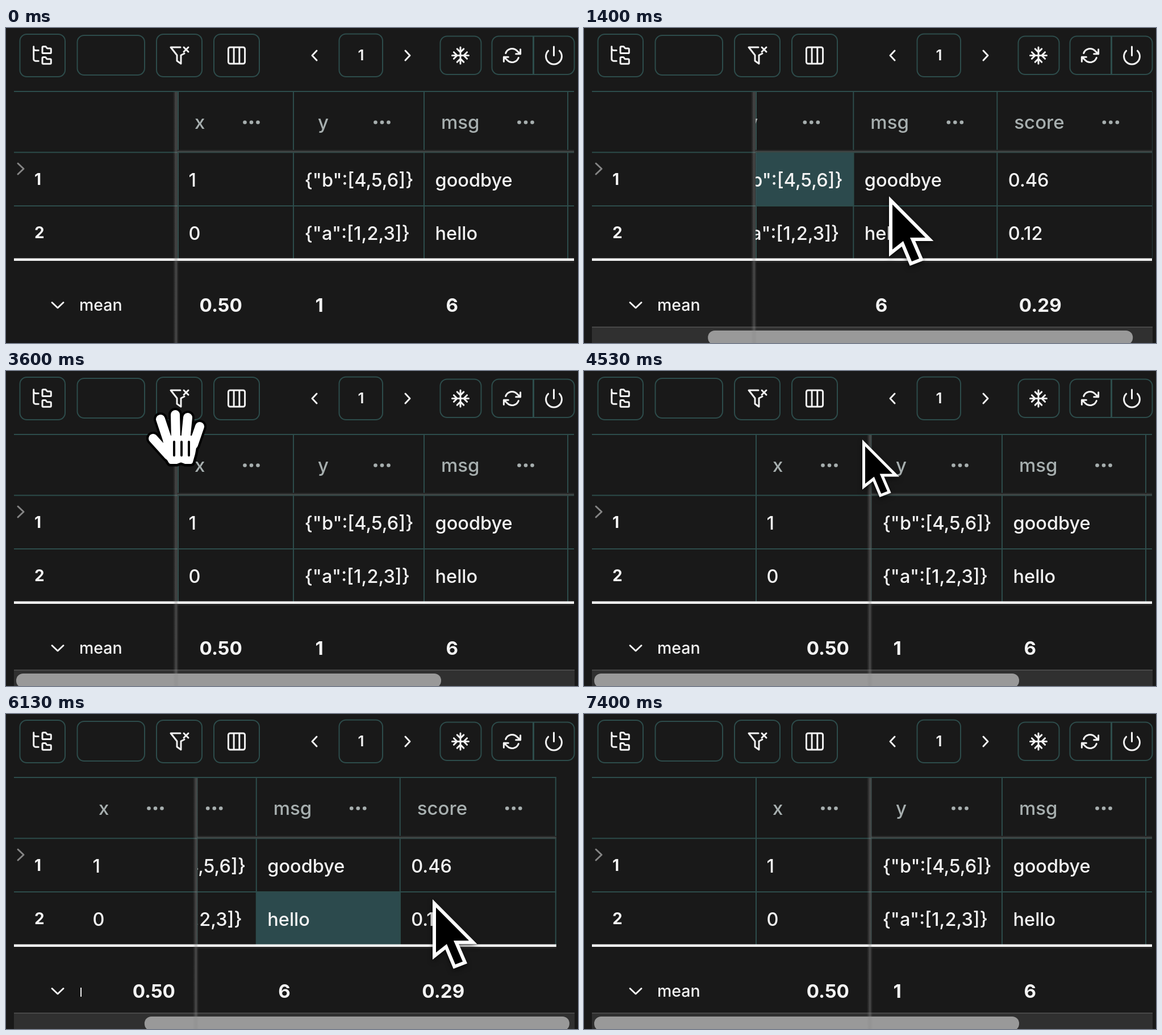
These frames come from a looping animation (1007x556 px, 7.67 s). An HTML page with a canvas:

```html
<!DOCTYPE html>
<html lang="en">
<head>
<meta charset="utf-8">
<title>Table with frozen columns</title>
<style>
html, body { margin: 0; height: 100%; overflow: hidden; background: #191919; }
canvas { display: block; }
</style>
</head>
<body>
<canvas id="stage" width="1007" height="556"></canvas>
<script>
const ctx = document.getElementById('stage').getContext('2d');
const LOOP = 7670, MAX_SCROLL = 300;
const BG = '#191919', TEAL = '#2d4c4b', HOVER = '#2c4a4d', WHITE = '#f3f3f3', GREY = '#a7afaf';
const INDEX_RIGHT = 302, X_RIGHT = 506, RIGHT = 1000, TABLE_END = 1263;

const columns = [
  { name: 'x', x: 302, w: 204, pad: 30, cells: ['1', '0'], mean: '0.50' },
  { name: 'y', x: 506, w: 230, pad: 43, cells: ['{"b":[4,5,6]}', '{"a":[1,2,3]}'], mean: '1' },
  { name: 'msg', x: 736, w: 253, pad: 30, cells: ['goodbye', 'hello'], mean: '6' },
  { name: 'score', x: 989, w: 274, pad: 30, cells: ['0.46', '0.12'], mean: '0.29' }
];
const rows = [{ y: 220, h: 94 }, { y: 315, h: 92 }];

// Keyframes: [time, value...], eased between neighbours
const scrollKeys = [[700, 0], [1603, MAX_SCROLL], [1750, MAX_SCROLL], [2400, 0],
                    [5150, 0], [6210, MAX_SCROLL], [6350, MAX_SCROLL], [7100, 0]];
const cursorKeys = [[300, 537, 297], [2670, 537, 297], [3300, 300, 118], [3700, 300, 118],
                    [4400, 490, 121], [4550, 490, 121], [5000, 751, 327]];
const handleKeys = [[3700, 300], [4400, 504]];
const sizeKeys = [[3620, 1], [3720, .83], [4540, .83], [4680, 1]];

function at(keys, t, i = 1) {
  if (t <= keys[0][0]) return keys[0][i];
  for (let k = 1; k < keys.length; k++) {
    const a = keys[k - 1], b = keys[k];
    if (t < b[0]) {
      const u = (t - a[0]) / (b[0] - a[0]);
      return a[i] + (b[i] - a[i]) * u * u * (3 - 2 * u);
    }
  }
  return keys[keys.length - 1][i];
}

function text(s, x, y, size, weight, color = WHITE, align = 'left') {
  ctx.font = `${weight} ${size}px Inter, sans-serif`;
  ctx.textAlign = align;
  ctx.fillStyle = color;
  ctx.fillText(s, x, y);
}

function fill(x, y, w, h, color) {
  ctx.fillStyle = color;
  ctx.fillRect(x, y, w, h);
}

function stroke(path, width, color = WHITE) {
  ctx.lineWidth = width;
  ctx.strokeStyle = color;
  ctx.lineCap = ctx.lineJoin = 'round';
  ctx.stroke(new Path2D(path));
}

function clipped(x, right, draw) {
  ctx.save();
  ctx.beginPath();
  ctx.rect(x, 0, right - x, 556);
  ctx.clip();
  draw();
  ctx.restore();
}

function icon(cx, cy, scale, path) {
  ctx.save();
  ctx.translate(cx - 12 * scale, cy - 12 * scale);
  ctx.scale(scale, scale);
  stroke(path, 3 / scale);
  ctx.restore();
}

function button(x, y, w, h) {
  ctx.beginPath();
  ctx.roundRect(x, y, w, h, 12);
  ctx.lineWidth = 2;
  ctx.strokeStyle = TEAL;
  ctx.stroke();
}

function toolbar() {
  button(24.5, 11, 79.5, 75);
  button(125.5, 13, 118.5, 70);
  button(265, 11, 80, 75);
  button(366, 11, 80, 75);
  button(586.5, 10.5, 76.5, 75.5);
  button(764.5, 14.5, 72, 67.5);
  button(855.5, 14.5, 145, 67.5);
  fill(927, 14, 3, 68, TEAL);
  icon(64, 48, 1.7, 'M20 10a1 1 0 0 0 1-1V6a1 1 0 0 0-1-1h-2.5a1 1 0 0 1-.8-.4l-.9-1.2A1 1 0 0 0 15 3h-2a1 1 0 0 0-1 1v5a1 1 0 0 0 1 1Z' +
    'M20 21a1 1 0 0 0 1-1v-3a1 1 0 0 0-1-1h-2.9a1 1 0 0 1-.88-.55l-.42-.85a1 1 0 0 0-.92-.6H13a1 1 0 0 0-1 1v5a1 1 0 0 0 1 1Z' +
    'M3 5a2 2 0 0 0 2 2h3M3 3v13a2 2 0 0 0 2 2h3');
  stroke('M307 34H290L301 48V58L308 63V48L314 45M313 34L321 42M321 34L313 42', 3);
  icon(406, 48.5, 1.62, 'M5 3H19a2 2 0 0 1 2 2V19a2 2 0 0 1-2 2H5a2 2 0 0 1-2-2V5a2 2 0 0 1 2-2ZM9 3V21M15 3V21');
  icon(800, 48.5, 1.45, 'M2 12H22M12 2V22M20 16l-4-4 4-4M4 8l4 4-4 4M16 4l-4 4-4-4M8 20l4-4 4 4');
  icon(891, 48.5, 1.33, 'M23 4v6h-6M1 20v-6h6M3.51 9a9 9 0 0 1 14.85-3.36L23 10M1 14l4.64 4.36A9 9 0 0 0 20.49 15');
  icon(964.5, 48.5, 1.55, 'M12 2V12M18.36 6.64a9 9 0 1 1-12.73 0');
  stroke('M547 40L539 48.5L547 57', 3);
  stroke('M703 40L711 48.5L703 57', 3);
  text('1', 625, 57, 26, 600, WHITE, 'center');
}

function indexColumn() {
  fill(INDEX_RIGHT, 112, 2, 295, TEAL);
  stroke('M21 239L31 248.5L21 258', 3, '#858585');
  text('1', 50, 277, 28, 700);
  text('2', 50, 371, 28, 700);
  stroke('M81 484.5L91 494L101 484.5', 3);
  text('mean', 129, 499, 28.5, 500);
}

function column(col, shift, hover, meanRight) {
  const x = col.x - shift;
  col.cells.forEach((value, i) => {
    const { y, h } = rows[i];
    if (hover && hover.col === col && hover.row === i) fill(x, y, col.w + 1, h, HOVER);
    text(value, x + 19.5, y + (i ? 58.5 : 59.5), 32.5, 500);
  });
  fill(x + col.w - 1, 112, 2, 295, TEAL);
  text(col.name, x + col.pad, 178, 33, 500, GREY);
  for (const d of [-11.5, 0, 11.5]) {
    ctx.beginPath();
    ctx.arc(x + col.w - 74 + d, 166.5, 3.3, 0, 7);
    ctx.fill();
  }
  if (meanRight) text(col.mean, x + 165, 501, 33.2, 700, WHITE, 'right');
  else text(col.mean, x + 38.5, 501, 33.2, 700);
}

function hoveredCell(t, x, y) {
  if (t < 300 || t > 7150) return null;
  // The hovered cell is only refreshed once scrolling has stopped
  const settled = t > 1620 && t < 2600 || t > 6260;
  const px = x + (settled ? MAX_SCROLL : 0);
  const col = columns.find(c => px >= c.x && px < c.x + c.w);
  const row = rows.findIndex(r => y >= r.y && y < r.y + r.h);
  return x > INDEX_RIGHT && col && row >= 0 ? { col, row } : null;
}

function table(t, scroll, hover) {
  const frozen = t >= 4400;
  const shift = frozen ? Math.min(scroll, 169) : 0;
  const pane = frozen ? X_RIGHT - shift : INDEX_RIGHT;
  const end = Math.min(RIGHT, TABLE_END - scroll + 1);

  indexColumn();
  if (frozen) clipped(INDEX_RIGHT - shift, pane, () => {
    if (shift) fill(0, 113, RIGHT, 443, BG);
    column(columns[0], shift, hover, true);
  });
  clipped(pane, RIGHT + 1, () => {
    for (const col of columns.slice(frozen ? 1 : 0)) column(col, scroll, hover);
  });

  fill(14, 111, end - 14, 2, TEAL);
  fill(14, 218.5, end - 14, 2, TEAL);
  fill(14, 313, end - 14, 2, TEAL);
  fill(pane, 215, end - pane, 3, '#272727');
  fill(pane, 217, end - pane, 2.5, '#3f4544');
  fill(14, 406.5, end - 14, 4.5, WHITE);
  fill(pane, 411, end - pane, 3, '#242424');
}

function scrollbar(scroll) {
  fill(14, 528, 987, 28, '#303030');
  fill(14, 527, 987, 2, '#484848');
  ctx.beginPath();
  ctx.roundRect(18 + scroll * .765, 534, 748, 25, 12);
  ctx.fillStyle = '#999';
  ctx.fill();
}

function paneHandle(x) {
  const glow = ctx.createLinearGradient(x - 6, 0, x + 4, 0);
  glow.addColorStop(0, 'rgba(130,130,130,0)');
  glow.addColorStop(.55, 'rgba(140,140,140,.42)');
  glow.addColorStop(1, 'rgba(130,130,130,0)');
  fill(x - 6, 113, 10, 443, glow);
}

function arrow() {
  const p = new Path2D('M6 14.5V94L25 79L40 115L53 110L37 73H64Z');
  ctx.lineJoin = 'miter';
  ctx.lineWidth = 12;
  ctx.strokeStyle = '#fff';
  ctx.shadowColor = 'rgba(0,0,0,.5)';
  ctx.shadowBlur = 8;
  ctx.shadowOffsetY = 4;
  ctx.stroke(p);
  ctx.shadowColor = 'transparent';
  ctx.fillStyle = '#000';
  ctx.fill(p);
}

function hand() {
  const fingers = 'M-28-33L-15 6M-2-41L-1 4M20-36L16 4M41-20L30 12M-41 1L-14 31';
  const palm = 'M-20 0L34 0L29 28L25 42L16 42L8 39L0 42L-10 42L-17 30Z';
  for (const [color, w, edge] of [['#000', 24, 17], ['#fff', 16, 8]]) {
    stroke(fingers, w, color);
    stroke(palm, edge, color);
    ctx.fillStyle = color;
    ctx.fill(new Path2D(palm));
  }
  stroke('M-4 7V31M9 7V31M22 7V31', 4, '#000');
}

function cursor(t, x, y) {
  if (t < 300 || t > 7200) return;
  const size = at(sizeKeys, t);
  ctx.save();
  ctx.translate(x, y);
  ctx.scale(size, size);
  (t > 3200 && t < 4450 ? hand : arrow)();
  ctx.restore();
}

function frame(now) {
  const t = now % LOOP;
  const scroll = at(scrollKeys, t);
  const x = at(cursorKeys, t, 1), y = at(cursorKeys, t, 2);
  fill(0, 0, 1007, 556, BG);
  toolbar();
  table(t, scroll, hoveredCell(t, x, y));
  if (t >= 670) scrollbar(scroll);
  paneHandle(at(handleKeys, t) - (t >= 4400 ? Math.min(scroll, 169) : 0));
  cursor(t, x, y);
}

const start = performance.now();
function tick() {
  frame(performance.now() - start);
  requestAnimationFrame(tick);
}
tick();
</script>
</body>
</html>
```
